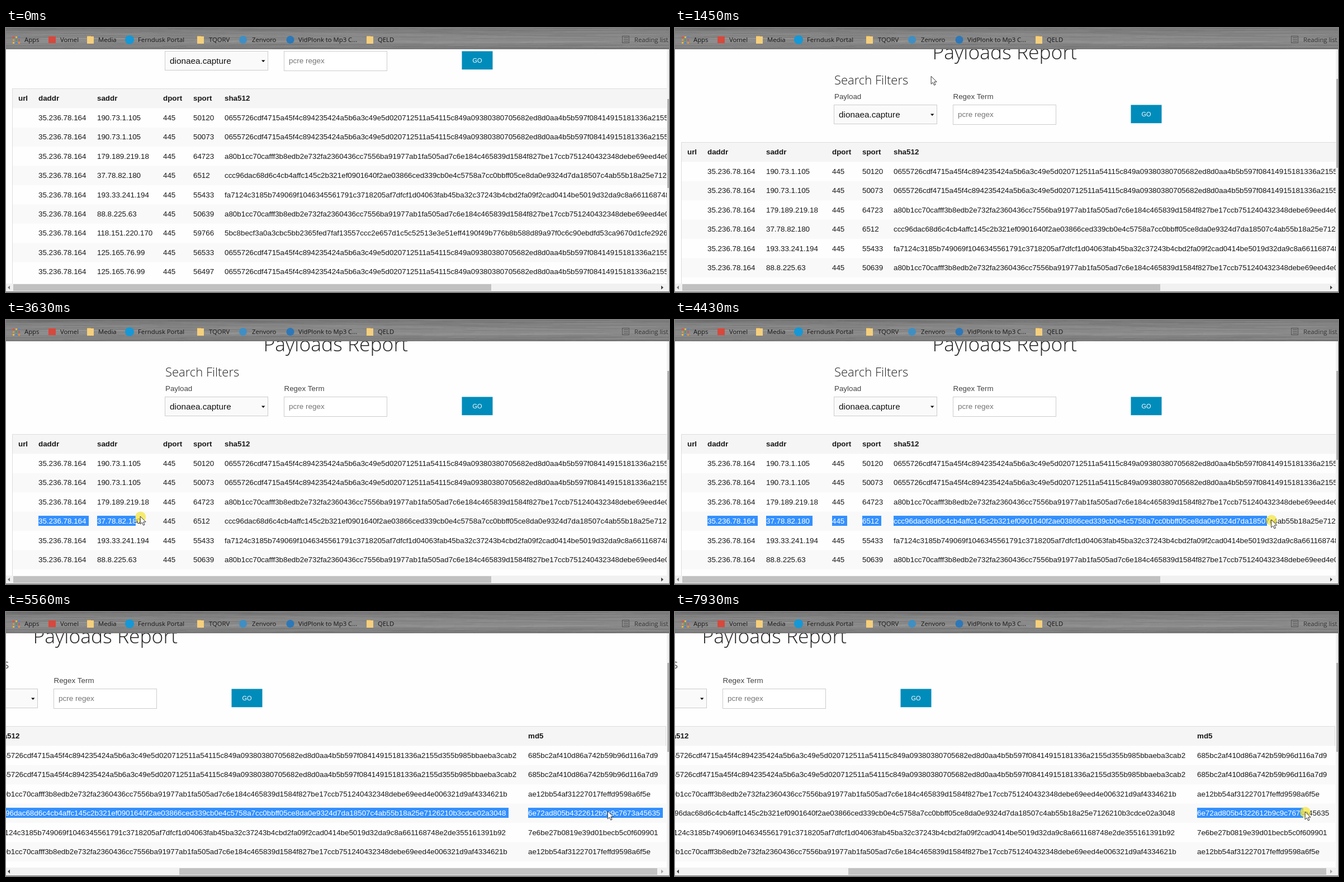
Write an HTML page with a canvas that moves like this. It is 1186 px wide and 472 px high and loops after 8 s.

```html
<!DOCTYPE html>
<html lang="en">
<head>
<meta charset="utf-8">
<title>Payloads Report</title>
<style>
html, body { margin: 0; width: 100%; height: 100%; overflow: hidden; background: #fefefe; }
canvas { display: block; }
</style>
</head>
<body>
<canvas id="stage" width="1186" height="472"></canvas>
<script>
const ctx = document.getElementById('stage').getContext('2d');
const LOOP = 8000, STEP = 66.1, FIRST = 260;
const VIEW = { x: 0, y: 38, w: 1182, h: 419 };
const SANS = '"Liberation Sans", Arial, sans-serif';
const BODY = '13.37px ' + SANS;
const INK = '#181818';
const COLS = [22, 58, 163, 281, 335, 391, 1346];
const HEADS = ['url', 'daddr', 'saddr', 'dport', 'sport', 'sha512', 'md5'];
const ROW_H = 34.4, ROWS_TOP = 143.5, PICKED = 3;

const hashA = ['0655726cdf4715a45f4c894235424a5b6a3c49e5d020712511a54115c849a09380380705682ed8d0aa4b5b597f08414915181336a2155d355b985bbaeba3cab2', '685bc2af410d86a742b59b96d116a7d9'];
const hashB = ['a80b1cc70cafff3b8edb2e732fa2360436cc7556ba91977ab1fa505ad7c6e184c465839d1584f827be17ccb751240432348debe69eed4e006321d9af4334621b', 'ae12bb54af31227017feffd9598a6f5e'];
const hashC = ['ccc96dac68d6c4cb4affc145c2b321ef0901640f2ae03866ced339cb0e4c5758a7cc0bbff05ce8da0e9324d7da18507c4ab55b18a25e7126210b3cdce02a3048', '6e72ad805b4322612b9c9c7673a45635'];
const hashD = ['fa7124c3185b749069f1046345561791c3718205af7dfcf1d04063fab45ba32c37243b4cbd2fa09f2cad0414be5019d32da9c8a661168748e2de355161391b92', '7e6be27b0819e39d01becb5c0f609901'];
const hashE = ['5bc8becf3a0a3cbc5bb2365fed7faf13557ccc2e657d1c5c52513e3e51eff4190f49b776b8b588d89a97f0c6c90ebdfd53ca9670d1cfe2926cf1c04c67dce15c', '996c2b2ca30180129c69352a3a3515e4'];
const rows = [
  ['190.73.1.105', '50120', hashA], ['190.73.1.105', '50073', hashA],
  ['179.189.219.18', '64723', hashB], ['37.78.82.180', '6512', hashC],
  ['193.33.241.194', '55433', hashD], ['88.8.225.63', '50639', hashB],
  ['118.151.220.170', '59766', hashE], ['125.165.76.99', '56533', hashA],
  ['125.165.76.99', '56497', hashA]
].map(([saddr, sport, hash]) => ['', '35.236.78.164', saddr, '445', sport, ...hash]);

// Key points: time, then one or more values.
const CURSOR = [
  [260, 487, 300], [730, 488, 242], [1060, 515, 182], [1120, 540, 180], [1300, 572, 120],
  [1500, 420, 75], [1700, 285, 120], [1920, 440, 140], [1980, 455, 145], [2510, 112, 401],
  [2770, 76, 358], [2980, 58, 354], [3060, 58, 354], [3630, 240, 351], [3700, 252, 351],
  [4430, 1073, 357], [4500, 1128, 357], [4570, 1186, 355], [4830, 1192, 355], [5290, 1190, 356],
  [5880, 930, 356], [6350, 930, 356], [6680, 936, 354], [7140, 936, 356], [7200, 933, 356],
  [7410, 934, 356], [7930, 1128, 357]
];
const SCROLL_X = [[4560, 0], [4820, 410], [4886, 412]];
const PRESSES = [[3060, 5290], [6140, 6350], [7405, LOOP]];

function track(keys, t) {
  const i = keys.findIndex(k => k[0] > t);
  if (i === 0) return keys[0].slice(1);
  if (i < 0) return keys[keys.length - 1].slice(1);
  const a = keys[i - 1], b = keys[i], p = (t - a[0]) / (b[0] - a[0]);
  return a.slice(1).map((v, j) => v + (b[j + 1] - v) * p);
}

function rect(x, y, w, h, fill, stroke) {
  ctx.fillStyle = fill;
  ctx.fillRect(x, y, w, h);
  if (stroke) {
    ctx.strokeStyle = stroke;
    ctx.lineWidth = 1;
    ctx.strokeRect(x + .5, y + .5, w - 1, h - 1);
  }
}

function text(str, x, y, font, color) {
  ctx.font = font;
  ctx.fillStyle = color;
  ctx.fillText(str, x, y);
}

function disc(x, y, r, color) {
  ctx.fillStyle = color;
  ctx.beginPath();
  ctx.arc(x, y, r, 0, 7);
  ctx.fill();
}

function poly(points, color) {
  ctx.fillStyle = color;
  ctx.beginPath();
  points.forEach(([x, y]) => ctx.lineTo(x, y));
  ctx.closePath();
  ctx.fill();
}

// Selected span in page coordinates; "spill" covers every row from the picked one down.
function selection(t, x, scrollX) {
  if ((t >= 3150 && t < 3280) || (t >= 6480 && t < 7000)) return { from: 0, to: 2000, spill: true };
  if (t >= 3060 && t < 4860) return { from: 58, to: Math.min(x, 1175) + scrollX - 8 };
  if (t >= 4860 && t < 6350) return { from: 58, to: 2000 };
  if (t >= 7405) return { from: 1346, to: x + scrollX - 3 };
  return null;
}

function drawRow(cells, index, sel) {
  const top = ROWS_TOP + index * ROW_H, base = Math.round(top + 21.5);
  rect(12, top, 1581, ROW_H, index % 2 ? '#f9f9f9' : '#fefefe');
  const active = sel && (index === PICKED || (sel.spill && index > PICKED));
  cells.forEach((cell, c) => {
    text(cell, COLS[c], base, BODY, INK);
    if (!active || !cell) return;
    const from = Math.max(COLS[c], sel.from);
    const to = Math.min(COLS[c] + ctx.measureText(cell).width + 4.5, sel.to);
    if (to <= from) return;
    ctx.save();
    ctx.beginPath();
    ctx.rect(from, Math.round(top + 7.3), Math.round(to) - from, 18);
    ctx.clip();
    rect(from, top, to - from + 1, ROW_H, '#3390ff');
    text(cell, COLS[c], base, BODY, '#fff');
    ctx.restore();
  });
}

function drawPage(scrollX, shiftY, sel) {
  ctx.save();
  ctx.beginPath();
  ctx.rect(VIEW.x, VIEW.y, VIEW.w, VIEW.h);
  ctx.clip();
  ctx.translate(-scrollX, shiftY);
  text('Payloads Report', 460.5, -40, '300 35.5px "Open Sans", sans-serif', '#222');
  text('Search Filters', 285, 5, '300 22px "Open Sans", sans-serif', '#222');
  text('Payload', 285, 31, BODY, '#444');
  text('Regex Term', 497.5, 31, BODY, '#444');
  rect(284, 41, 185, 35, '#fafafa', '#ccc');
  text('dionaea.capture', 293, 64, '15.3px ' + SANS, '#111');
  poly([[457, 57.5], [463.5, 57.5], [460.2, 61]], '#000');
  rect(497, 41, 185, 36, '#fff', '#ccc');
  text('pcre regex', 506, 63, '13.5px ' + SANS, '#757575');
  rect(815.5, 41.5, 55, 32.7, '#008cba');
  text('GO', 834.5, 61.5, '11px ' + SANS, '#fff');
  rect(11, 108, 1582, 500, '#fefefe', '#ddd');
  rect(12, 109, 1580, 34.5, '#f5f5f5');
  HEADS.forEach((head, c) => text(head, COLS[c], 129.5, 'bold ' + BODY, INK));
  rows.forEach((cells, i) => drawRow(cells, i, sel));
  ctx.restore();
}

function drawScrollbars(scrollX, shiftY) {
  rect(1182, 38, 4, 419, '#f1f1f1');
  rect(1183, 127 - 36 * shiftY / 96, 3, 159, '#b0b0b0');
  rect(0, 457, 1186, 15, '#f1f1f1');
  rect(13 + scrollX * 297 / 412, 458, 855, 12, '#c1c1c1');
  poly([[3, 464], [7, 460.5], [7, 467.5]], scrollX > 0 ? '#404040' : '#808080');
  poly([[1176, 464], [1172, 460.5], [1172, 467.5]], scrollX < 412 ? '#404040' : '#a3a3a3');
  rect(0, 471, 1186, 1, '#777');
}

function folder(x) {
  rect(x, 14, 7, 3, '#d9a441');
  rect(x, 15, 12, 13, '#f5cf7c');
}

function drawToolbar() {
  const shade = ctx.createLinearGradient(0, 0, 0, 38);
  [[0, '#757575'], [.3, '#858585'], [.6, '#8b8b8b'], [1, '#777']].forEach(s => shade.addColorStop(...s));
  rect(0, 0, 1186, 38, shade);
  let seed = 7;
  const random = () => (seed = seed * 16807 % 2147483647) / 2147483647;
  for (let i = 0; i < 420; i++) {
    const tone = random() < .5 ? '0,0,0' : '255,255,255';
    rect(random() * 1300 - 120, Math.floor(random() * 38), 40 + random() * 220, 1, `rgba(${tone},.04)`);
  }
  const dots = ['#d9534a', '#e8912d', '#e8b93c', '#4c9b5c', '#4a86d8'];
  for (let i = 0; i < 9; i++) rect(12 + i % 3 * 5, 15 + Math.floor(i / 3) * 5, 3, 3, dots[(i * 2) % 5]);
  rect(76, 15, 13, 12, '#d8483c');
  [145, 342, 645].forEach(folder);
  disc(221, 21, 8, '#1698d6');
  disc(424, 21, 7, '#3f8fc4');
  disc(508.5, 21, 7, '#2d78b8');
  const label = '11.3px "Open Sans", sans-serif';
  [['Apps', 33], ['Vomel', 97], ['Media', 165], ['Ferndusk Portal', 236], ['TQORV', 363],
   ['Zenvoro', 440], ['VidPlonk to Mp3 C...', 523], ['QELD', 665]]
    .forEach(([name, x]) => text(name, x, 25, label, '#171717'));
  rect(1102, 14, 13, 13, 'rgba(0,0,0,0)', '#555');
  [17, 20, 23].forEach(y => rect(1105, y, 8, 1, '#555'));
  text('Reading list', 1124, 25, label, '#333');
}

function drawCursor(t, x, y) {
  if (t < FIRST) return;
  if (PRESSES.some(([a, b]) => t >= a && t < b)) disc(x + .5, y + 1, 9.5, 'rgba(245,230,50,.7)');
  poly([[x, y], [x, y + 14], [x + 3.2, y + 11], [x + 5.5, y + 16], [x + 7.8, y + 15], [x + 5.6, y + 10], [x + 10, y + 10]], '#fff');
  ctx.strokeStyle = '#333';
  ctx.lineWidth = 1;
  ctx.stroke();
}

function draw(now) {
  let t = now % LOOP;
  t = t < FIRST ? 0 : FIRST + Math.floor((t - FIRST + 3) / STEP) * STEP;
  const [x, y] = track(CURSOR, t);
  const [scrollX] = track(SCROLL_X, t);
  const p = Math.min(1, Math.max(0, (t - 260) / 740));
  const shiftY = Math.round(96 * (1 - (1 - p) ** 3));
  rect(0, 0, 1186, 472, '#fefefe');
  drawPage(Math.round(scrollX), shiftY, selection(t, x, scrollX));
  drawScrollbars(scrollX, shiftY);
  drawCursor(t, x, y);
  drawToolbar();
  requestAnimationFrame(() => draw(performance.now() - start));
}

const start = performance.now();
draw(0);
</script>
</body>
</html>
```
